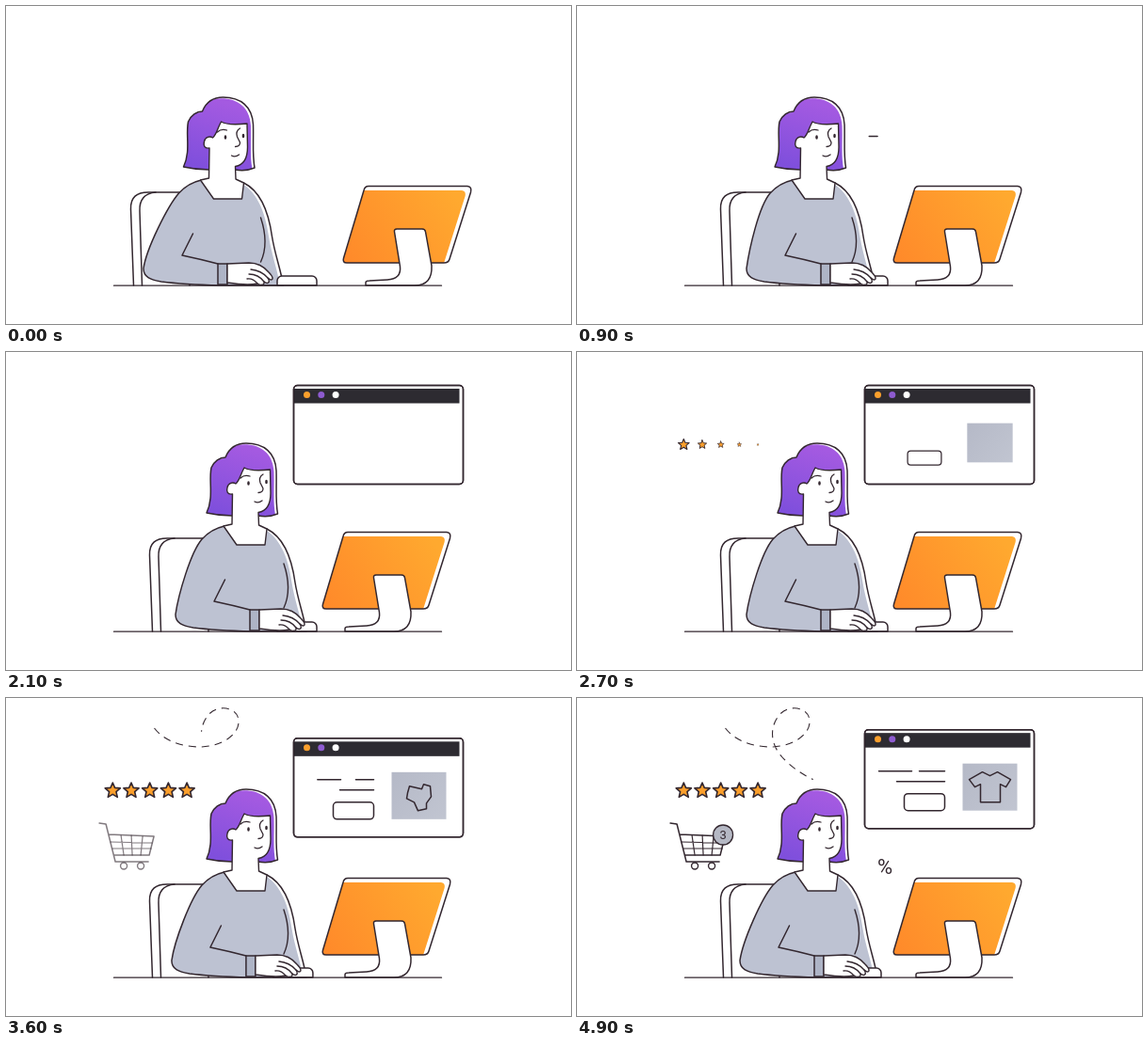
Recreate the animation shown at these times as an HTML page with a canvas. Size 600 by 338 pixels, loop 5 s.

```html
<!DOCTYPE html>
<html lang="en">
<head>
<meta charset="utf-8">
<title>Online shopping</title>
<style>
html, body { margin: 0; height: 100%; overflow: hidden; background: #fff; }
canvas { display: block; }
</style>
</head>
<body>
<canvas id="stage" width="600" height="338"></canvas>
<script>
const ctx = document.getElementById('stage').getContext('2d');
const LOOP = 5000, STEP = 100;
const INK = '#33272f', GRAY = '#bdc2d2', ORANGE = '#fb9f2c';

const lin = (t, a, b) => Math.min(1, Math.max(0, (t - a) / (b - a)));
const ease = (t, a, b) => { const u = lin(t, a, b); return u * u * (3 - 2 * u); };

function gradient(x0, y0, x1, y1, from, to) {
  const g = ctx.createLinearGradient(x0, y0, x1, y1);
  g.addColorStop(0, from);
  g.addColorStop(1, to);
  return g;
}

function at(x, y, scale, draw) {
  ctx.save();
  ctx.translate(x, y);
  ctx.scale(scale, scale);
  draw();
  ctx.restore();
}

function shape(d, fill, width = 1.5) {
  const p = new Path2D(d);
  if (fill) { ctx.fillStyle = fill; ctx.fill(p); }
  if (width) { ctx.lineWidth = width; ctx.stroke(p); }
}

// Outlined shape whose colour is shifted, leaving a white rim.
function rimmed(d, fill, dx, dy) {
  const p = new Path2D(d);
  ctx.fillStyle = '#fff';
  ctx.fill(p);
  ctx.save();
  ctx.clip(p);
  ctx.translate(dx, dy);
  ctx.fillStyle = fill;
  ctx.fill(p);
  ctx.restore();
  ctx.lineWidth = 1.5;
  ctx.stroke(p);
}

function box(x, y, w, h, r, fill) {
  ctx.beginPath();
  ctx.roundRect(x, y, w, h, r);
  ctx.fillStyle = fill;
  ctx.fill();
  ctx.lineWidth = 1.5;
  ctx.stroke();
}

function disc(x, y, r, fill, width = 0) {
  ctx.beginPath();
  ctx.arc(x, y, r, 0, 7);
  ctx.fillStyle = fill;
  ctx.fill();
  if (width) { ctx.lineWidth = width; ctx.stroke(); }
}

function eye(x, y) {
  ctx.beginPath();
  ctx.ellipse(x, y, 1.3, 2.2, 0, 0, 7);
  ctx.fillStyle = INK;
  ctx.fill();
}

function label(text, x, y, size) {
  ctx.font = `${size}px Roboto, sans-serif`;
  ctx.textAlign = 'center';
  ctx.textBaseline = 'middle';
  ctx.fillStyle = INK;
  ctx.fillText(text, x, y);
}

function chair() {
  shape('M155.500 297 L152.500 216 C152 203 159 198 171 198 L215 198 L215 297', '#fff');
  shape('M164.500 297 L162 218 C161.500 206 167 199 179 198', null);
}

function monitor() {
  rimmed('M363 191.500 L468 191.500 Q473 192 471.500 198 L449 269 Q448 273 443 273 ' +
    'L340 273 Q335 273 336.500 268 L358 196 Q359 191.500 363 191.500 Z',
    gradient(345, 270, 460, 195, '#ff892a', '#ffa92f'), -6, 4.5);
  shape('M393 237 H420 Q423 237 423.500 240 L430 276 Q431 297 412 297 H360 V294 ' +
    'Q360 292 364 292 L383 291 Q398 290 396.500 277 L390.500 240 Q390 237 393 237 Z', '#fff');
}

function torso(b, a) {
  rimmed(`M${232 + b} 185 Q${218 + b} 188 ${208 + b} 199
    C${196 + b} 213 ${176 + a} 258 ${173 + a} 279
    C${173 + a} 288 ${180 + a} 291 ${192 + a} 293
    Q${215 + a} 296 ${255 + a} 297 L${319 + b} 297
    C${316 + b} 279 ${310 + b} 264 ${307 + b} 245
    C${303 + b} 216 ${293 + b} 196 ${277 + b} 188 Z`, GRAY, -3.5, 0);
}

function head() {
  rimmed('M213 171 C221 154 215 137 218 123 C221 116 227 112 233 112 ' +
    'C237 102 245 97 255 97 C274 97 286 107 287 126 C287.500 146 286 158 288.500 172 ' +
    'Q279 176 268 174 L240 174 Q226 174 213 171 Z',
    gradient(262, 102, 240, 172, '#a45ae1', '#7f4fdc'), -2.5, 1.2);
  shape('M253 123 C259 126.500 271 126 280.500 125 L281 150 C281 161 277 169 268 170.500 ' +
    'L268.500 184 L277 188 L275 205 L245 205 L231 185 L240 183 L240.500 151 ' +
    'C235 152 234 148 235 144 C236 139 241 138 244 140 C248 137 249 130 253 123 Z', '#fff', 1.4);
  shape('M249 134 Q253 130 259 132 M273 130 Q268 133 270 139 L273 145 Q273 149.500 268 149.500 ' +
    'M264 159 Q268 161 272 158', null, 1.3);
  eye(257.5, 139.5);
  eye(276.5, 138);
}

function arm() {
  shape('M225.500 242 L214 265 Q233 269 252 274', null);
  shape('M252 274 H262 V296 H252 Z', '#aeb4c6');
  shape('M262 274 L285 273 C293 273 301 277 306 283 C311 288 311 291 308 291 L305 289 ' +
    'C308 294 305 296 301 293 C302 297 297 297 294 295 C285 297 275 296 262 294 Z', '#fff', 1.4);
  shape('M287 280 Q298 281 305 289 M285 285 Q295 285 301 293 M283 290 Q289 289 294 295', null, 1.3);
}

const BLOB = [[123, 51], [136, 54], [138, 49], [145, 51], [146, 62], [141, 69],
  [141, 75], [132, 77], [128, 68], [120, 64], [121, 58]];
const SHIRT = [[125, 45], [133, 49], [141, 45], [155, 53], [150, 61], [144, 58],
  [144, 77], [123, 77], [123, 58], [117, 61], [111, 53]];

function shirt(t) {
  const size = ease(t, 3100, 3600), k = ease(t, 3600, 4100);
  if (!size) return;
  const d = BLOB.map(([x, y], i) => [
    133 + (x + (SHIRT[i][0] - x) * k - 133) * size,
    61 + (y + (SHIRT[i][1] - y) * k - 61) * size
  ]).join('L');
  shape(`M${d}Z`, null, 1.5);
}

function browser(t) {
  const s = ease(t, 750, 1870);
  if (s < 0.03) return;
  const drift = t < 2700 ? 35.5 : 38 + 5 * Math.cos((t - 3500) / 1200 * Math.PI);
  const w = 180 * s, h = 105 * s * lin(t, 900, 1200);
  at(305.5 + 5 * (1 - s), drift + 105 - h - 2 * (1 - s), 1, () => {
    box(0, 0, w, h, 4, '#fff');
    if (!h) return;
    ctx.save();
    ctx.clip();
    ctx.fillStyle = '#2d2b31';
    ctx.fillRect(0, 3.5 * s, w - 4 * s, Math.min(h, 15.5 * s));
    [ORANGE, '#8e5bd0', '#fff'].forEach((c, i) => disc((14 + 15.3 * i) * s, 10 * s, 3.5 * s, c));
    ctx.restore();
    box(0, 0, w, h, 4, 'transparent');

    const pop = lin(t, 2200, 2800);
    if (pop) {
      at(133, 61, pop, () => {
        ctx.fillStyle = gradient(-29, -25, 29, 25, '#b5b9c7', '#c1c5d1');
        ctx.fillRect(-29, -25, 58, 50);
      });
      at(63.5, 77, pop, () => box(-21.5, -9, 43, 18, 4, '#fff'));
    }
    const grow = lin(t, 3000, 3850);
    if (grow) {
      for (const [x, len, y] of [[50, 35, 44], [85, 27, 44], [85, 51, 55]])
        shape(`M${x} ${y}h${-len * grow}`, null, 1.5);
    }
    shirt(t);
  });
}

function stars(t) {
  let d = '';
  for (let i = 0; i < 10; i++) {
    const r = i % 2 ? 3.9 : 8.5, a = i * Math.PI / 5;
    d += (i ? 'L' : 'M') + r * Math.sin(a) + ' ' + -r * Math.cos(a);
  }
  for (let i = 0; i < 5; i++) {
    const start = 2200 + 100 * i, s = lin(t, start, start + 700);
    if (s) at(113.3 + 19.7 * i, 98.5, s, () => shape(d + 'Z', ORANGE, 1.6));
  }
}

function trail(t) {
  const shown = 240 * lin(t, 3000, 3850);
  if (!shown) return;
  const dashes = [];
  for (let d = 0; d < shown; d += 14) dashes.push(Math.min(8, shown - d), 6);
  ctx.save();
  ctx.lineCap = 'butt';
  ctx.setLineDash([...dashes, 0, 999]);
  shape('M157.500 32 C169 47 189 52 207 52 C231 51 248 38 247 24 C246 9 224 6 214 19 ' +
    'C203 34 207 51 218 63 C227 73 240 82 253 87.500', null, 1.1);
  ctx.restore();
}

function cart(t) {
  const shown = lin(t, 3200, 3850);
  if (!shown) return;
  const sway = 3.3 + 3.3 * Math.cos((t - 4300) / 650 * Math.PI);
  ctx.globalAlpha = shown;
  at(sway, 0, 1, () => {
    shape('M99 133 L106 134 L116 174 H151 M109 145 L157 147 L152 167 L115 167', null, 1.5);
    shape('M111 153 L155 154 M113 160 L154 160 M122 146 L125 167 M133 146 L134 167 M145 147 L143 167', null, 1.2);
    disc(125, 178.5, 3.5, '#fff', 1.4);
    disc(143, 178.5, 3.5, '#fff', 1.4);
    const pop = lin(t, 4200, 4600);
    if (pop) at(155, 145.5, pop, () => {
      disc(0, 0, 10.5, '#b5b8c4', 1.3);
      label('3', 0, 0.8, 13);
    });
  });
  ctx.globalAlpha = 1;
}

function percent(t) {
  ctx.globalAlpha = lin(t, 4100, 4500);
  label('%', 327, 195 - 14 * ease(t, 4100, 4900), 22);
  ctx.globalAlpha = 1;
}

function scene(t) {
  ctx.fillStyle = '#fff';
  ctx.fillRect(0, 0, 600, 338);
  ctx.strokeStyle = INK;
  ctx.lineJoin = ctx.lineCap = 'round';

  const away = 1 - ease(t, 0, 800);
  const lean = -24.5 * (1 - ease(t, 0, 1150));
  const pull = 7 * (1 - ease(t, 3100, 4000));
  const reach = pull - 34 * away;

  trail(t);
  stars(t);
  cart(t);
  browser(t);
  percent(t);
  at(-20 * away, 0, 1, chair);
  at(22 * away, 0, 1, monitor);
  torso(lean, reach);
  at(lean, 0, 1, () => {
    shape('M295 225 C301 243 301 259 295 272', null, 1.4);
    head();
  });
  box(281 + pull, 287, 42, 10, [5, 5, 0, 0], '#fff');
  at(reach, 0, 1, arm);
  shape('M114.500 297.200 H462.500', null, 1.3);
}

function tick(now) {
  scene(Math.floor(now % LOOP / STEP) * STEP);
  requestAnimationFrame(tick);
}
scene(0);
requestAnimationFrame(tick);
</script>
</body>
</html>
```
